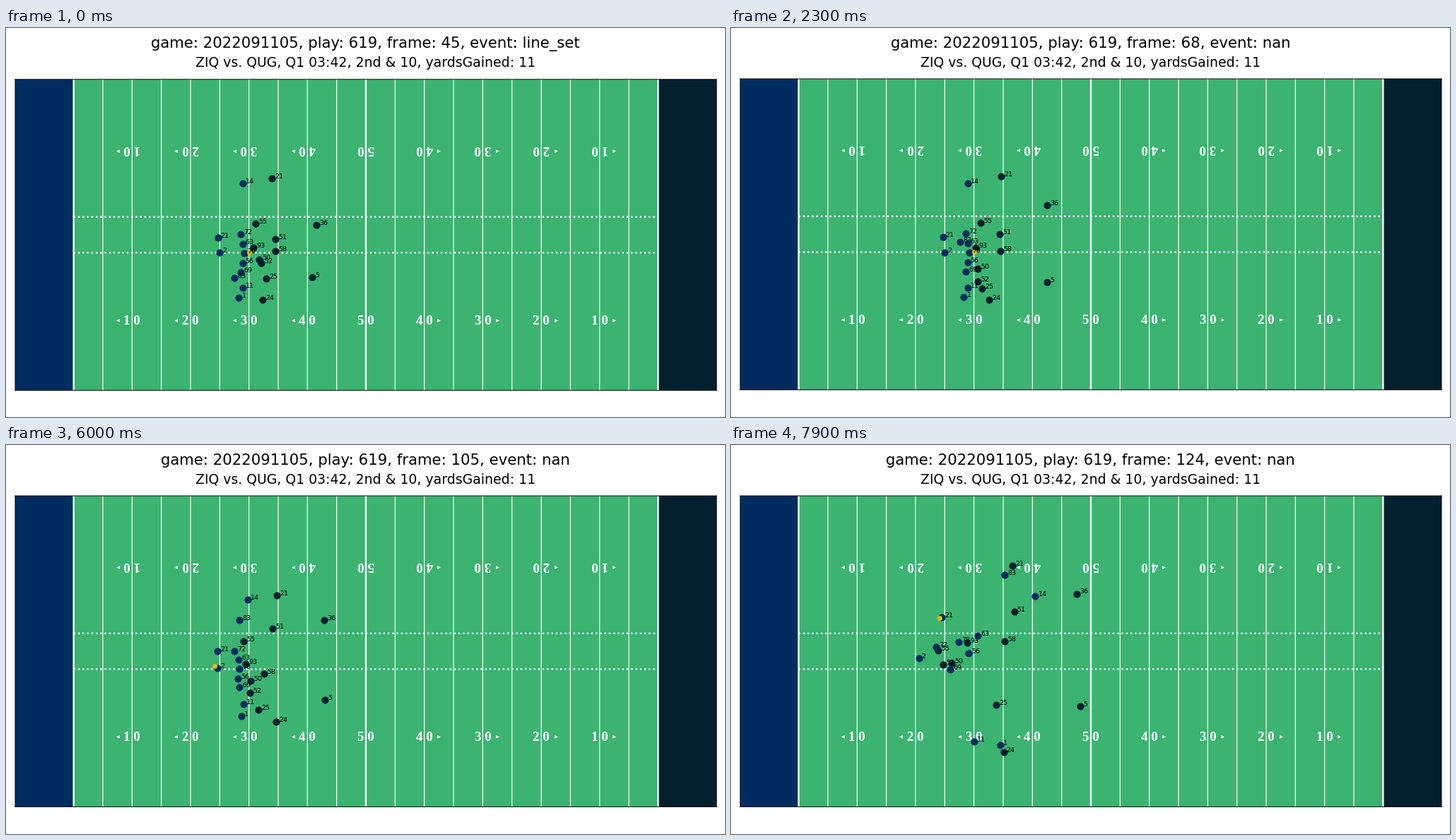
These frames come from a looping animation (1017 px wide and 551 px high, 8 s). A matplotlib script:

```python
import matplotlib.pyplot as plt
import numpy as np
from matplotlib.animation import FuncAnimation
from matplotlib.patches import Rectangle

plt.rcParams.update({"font.family": "DejaVu Sans", "path.snap": False})

W, H, DPI = 1017, 551, 64
PT = 85 / DPI                         # layout is designed at 85 dpi
FRAMES, FIRST = 80, 45
SNAP, THROW, CATCH = 53, 73, 78
LEFT, RIGHT, TOP, BOTTOM = 13, 1005, 72, 512.5
YARD = (RIGHT - LEFT) / 120
OFF, DEF, GOLD = "#002c5f", "#03202f", "#e0ba14"
EVENTS = {0: "line_set", SNAP: "ball_snap", THROW: "pass_forward",
          CATCH: "pass_outcome_caught"}

# First steps after the snap, added to a player's steady acceleration.
STILL, BLOCK, DROP, CUT = (0, 0), (-16, 4), (0, 15), (0, -12)

fig = plt.figure(figsize=(W / DPI, H / DPI), dpi=DPI, facecolor="white")
ax = fig.add_axes([0, 0, 1, 1], facecolor="#3cb371")
ax.set(xlim=(LEFT, RIGHT), ylim=(BOTTOM, TOP), xticks=[], yticks=[])
for spine in ax.spines.values():
    spine.set_linewidth(0.8 * PT)


def place_field(dy):
    ax.set_position([LEFT / W, 1 - (BOTTOM + dy) / H,
                     (RIGHT - LEFT) / W, (BOTTOM - TOP) / H])


def yard_x(yd):
    return LEFT + yd * YARD


def draw_field():
    for yd, color in ((0, OFF), (110, DEF)):
        ax.add_patch(Rectangle((yard_x(yd), TOP), 10 * YARD, BOTTOM - TOP, fc=color, lw=0))
    for yd in range(10, 111, 5):
        lw = 2 if yd in (10, 60, 110) else 1
        ax.plot([yard_x(yd)] * 2, [BOTTOM, TOP], color="white", lw=lw * PT,
                solid_capstyle="butt", zorder=1)
    for yd in (23.583, 29.717):
        y = BOTTOM - yd * YARD
        ax.plot([yard_x(10), yard_x(110)], [y, y], ":", color="white", lw=2 * PT, zorder=1)
    for yd in range(20, 101, 10):
        x, label = yard_x(yd), f"{5 - abs(60 - yd) // 10} 0"
        for mid, base, turn in ((413, 419.3, 0), (173, 166, 180)):
            ax.text(x, base, label, color="white", size=16 * PT, weight="bold",
                    family="Liberation Serif", ha="center", va="baseline",
                    rotation=turn, rotation_mode="anchor", zorder=2)
            if yd != 60:
                side = np.sign(yd - 60)
                ax.plot(x + 20.6 * side, mid, ">" if side > 0 else "<",
                        color="white", ms=4 * PT, mew=0, zorder=2)


clock = np.arange(FRAMES)[:, None]
rush = np.clip((clock - SNAP) / (FRAMES - 1 - SNAP), 0, 1)


def ramp(start, end):
    return np.clip((clock - start) / (end - start), 0, 1)


def ease(start, end):
    u = ramp(start, end)
    return u * u * (3 - 2 * u)


def mix(a, b, u):
    return (1 - u) * a + u * b


squads = {DEF: [], OFF: []}


def player(team, number, spot, end, step=STILL, start=None, shift=(0, 24)):
    """Shift from start to spot before the snap, then accelerate to end."""
    spot, end, step = (np.array(p, float) for p in (spot, end, step))
    path = spot + rush ** 2 * (end - spot) + 2 * rush * (1 - rush) * step
    if start:
        path = path + (1 - ease(*shift)) * (start - spot)
    squads[team].append((number, path))
    return path


line = zip((72, 63, 78, 56, 69),
           ((290, 286), (349, 270), (322, 279), (336, 295), (310, 318)),
           (BLOCK, BLOCK, BLOCK, BLOCK, STILL))
for i, (number, end, step) in enumerate(line):
    player(OFF, number, (337 - 2.5 * abs(i - 2), 291.3 + 13.5 * i), end, step)
player(OFF, 14, (335, 219.6), (430.4, 213.6))
player(OFF, 83, (325.3, 252.8), (387, 183.6), start=(323, 353.4), shift=(6, 40))
player(OFF, 11, (335, 367.7), (344, 420.4), CUT)
player(OFF, 1, (329.3, 381.1), (381.2, 425.4))
passer = player(OFF, 2, (301.7, 317.5), (265.6, 301.6))
back = player(OFF, 21, (299.6, 296.1), (298, 244.3))

player(DEF, 21, (382, 210.3), (398, 170.8), DROP, start=(376, 212.6))
player(DEF, 36, (447.3, 250.8), (488.7, 210.5), start=(439, 278.4))
player(DEF, 55, (346.5, 275.6), (293.3, 290.6), BLOCK, start=(352.8, 276.3), shift=(30, 53))
player(DEF, 51, (375.3, 266.5), (400.6, 236.3), CUT, start=(381, 298), shift=(10, 58))
player(DEF, 93, (346, 310.8), (334, 279.5), BLOCK, start=(350, 310.2))
player(DEF, 58, (363.6, 321), (387.2, 278), DROP, start=(381.2, 315.5), shift=(20, 53))
player(DEF, 50, (348.8, 341.3), (312, 308.7), CUT, start=(357.8, 326.8))
player(DEF, 52, (348.8, 359.5), (300, 311), CUT, start=(360.7, 332.2))
player(DEF, 25, (355.3, 369.3), (375.4, 368.2), DROP, start=(368.2, 354))
player(DEF, 5, (447.3, 360.5), (494, 369.6), start=(433, 352.6))
player(DEF, 24, (381.8, 388.6), (385.5, 435.2), start=(363, 384), shift=(15, 53))

ball = mix(np.array([343.5, 317]), passer - (4.5, 3), ramp(SNAP, SNAP + 6))
ball = mix(ball, back + (-3, 1), ramp(THROW, CATCH))


def dots(color, size, zorder):
    return ax.scatter([], [], s=size * PT ** 2, c=color, lw=1.5 * PT, zorder=zorder)


def title(y, size, text=""):
    return fig.text(508.5 / W, 1 - y / H, text, size=size * PT, ha="center", va="baseline")


draw_field()
marks = {team: dots(team, 50, 3 + i / 10) for i, team in enumerate(squads)}
ball_mark = dots(GOLD, 20, 3.5)
tags = [(ax.text(0, 0, str(number), size=8 * PT, va="baseline", zorder=4), path)
        for squad in squads.values() for number, path in squad]
headline = title(28, 18)
title(55, 16, "ZIQ vs. QUG, Q1 03:42, 2nd & 10, yardsGained: 11")


def update(i):
    event = EVENTS.get(i, "nan")
    headline.set_text(f"game: 2022091105, play: 619, frame: {FIRST + i}, event: {event}")
    place_field(0.75 if "_" in event else 0)   # the underscore pushes the field down
    for team, squad in squads.items():
        marks[team].set_offsets([path[i] for _, path in squad])
    ball_mark.set_offsets([ball[i]])
    for tag, path in tags:
        tag.set_position(path[i] + (YARD / 2, 0))


anim = FuncAnimation(fig, update, frames=FRAMES, interval=100, repeat=True, repeat_delay=0)
plt.show()
```
